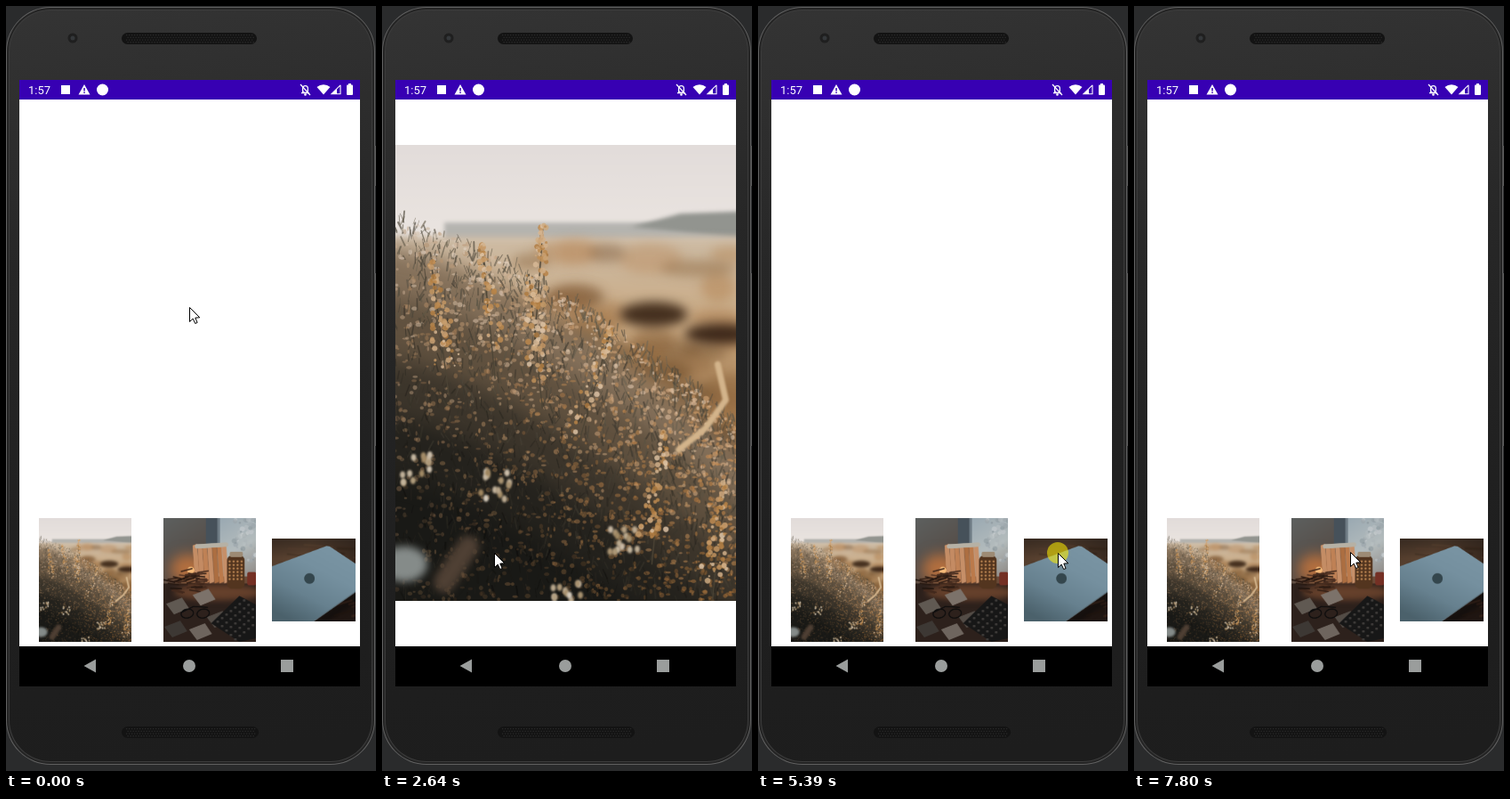
Animation of 416x859 px, one loop 8 s. Source, as an HTML page with a canvas:

```html
<!DOCTYPE html>
<html lang="en">
<head>
<meta charset="utf-8">
<title>Photo transition</title>
<style>
html, body { margin: 0; width: 100%; height: 100%; overflow: hidden; background: #2a2b2c; }
canvas { display: block; }
</style>
</head>
<body>
<canvas id="stage" width="416" height="859"></canvas>
<script>
const g = document.getElementById('stage').getContext('2d');
g.imageSmoothingQuality = 'high';

let seed = 7;
const rnd = () => (seed = seed * 16807 % 2147483647) / 2147483647;
const spread = r => (rnd() - .5) * 2 * r;
const clamp = v => Math.min(1, Math.max(0, v));

// ---------- drawing helpers ----------
function rect(c, color, x, y, w, h, r = 0) {
  c.fillStyle = color;
  c.beginPath();
  c.roundRect(x, y, w, h, r);
  c.fill();
}
function disc(c, color, x, y, rx, ry = rx) {
  c.fillStyle = color;
  c.beginPath();
  c.ellipse(x, y, rx, ry, 0, 0, 7);
  c.fill();
}
function trace(c, pts) {
  c.beginPath();
  for (let i = 0; i < pts.length; i += 2) c.lineTo(pts[i], pts[i + 1]);
}
function poly(c, color, pts) {
  trace(c, pts);
  c.fillStyle = color;
  c.fill();
}
function line(c, color, width, pts) {
  trace(c, pts);
  c.strokeStyle = color;
  c.lineWidth = width;
  c.stroke();
}
function soft(c, blur, draw) {
  c.filter = `blur(${blur}px)`;
  draw();
  c.filter = 'none';
}
function gradient(c, x0, y0, x1, y1, ...colors) {
  const grad = c.createLinearGradient(x0, y0, x1, y1);
  colors.forEach((col, i) => grad.addColorStop(i / (colors.length - 1), col));
  return grad;
}
function picture(w, h, scale, draw) {
  const canvas = document.createElement('canvas');
  canvas.width = w * scale;
  canvas.height = h * scale;
  const c = canvas.getContext('2d');
  c.scale(scale, scale);
  c.lineCap = c.lineJoin = 'round';
  draw(c);
  return canvas;
}

// ---------- photographs ----------
const meadow = picture(383, 511, 2, c => {
  rect(c, gradient(c, 0, 0, 0, 85, '#e2dcda', '#e9e3df'), 0, 0, 383, 110);
  soft(c, 5, () => {
    rect(c, '#b5b4b0', 55, 87, 350, 20);
    poly(c, '#92948f', [265, 92, 320, 77, 400, 74, 400, 105]);
  });
  soft(c, 8, () => rect(c, gradient(c, 0, 100, 0, 511, '#cdbca6', '#c9a982', '#9f7549', '#694a2e', '#332619'), -30, 103, 450, 450));

  // blurred field on the right
  soft(c, 12, () => {
    for (let i = 0; i < 60; i++) {
      const y = 120 + rnd() * 300, light = 62 - y / 9 + spread(14);
      disc(c, `hsl(30 40% ${light}% / .45)`, 130 + rnd() * 260, y, 18 + rnd() * 25, 8 + rnd() * 10);
    }
    disc(c, '#45301f', 290, 190, 38, 14);
    disc(c, '#3f2a1b', 365, 212, 40, 12);
  });

  // the heather rises to the left and gets darker with depth
  const top = x => 85 + 225 * (x / 383) ** 1.4;
  soft(c, 24, () => {
    [['#84705a', 30], ['#60513f', 85], ['#3c352b', 155], ['#24221d', 220], ['#191916', 290]].forEach(([color, drop]) => {
      const edge = [-60, top(0) + drop];
      for (let x = 0; x <= 440; x += 55) edge.push(x, top(x) + drop);
      poly(c, color, [...edge, 460, 600, -60, 600]);
    });
  });
  for (let i = 0; i < 4200; i++) {
    const x = rnd() * 383, y = top(x) + rnd() ** 1.2 * (511 - top(x));
    const d = clamp((y - top(x)) / 330), bloom = rnd() < .45;
    const light = bloom ? 72 - 42 * d + spread(12) : 32 - 22 * d + spread(8);
    const tone = `hsl(${bloom ? 30 : 40} ${bloom ? 28 + x / 16 : 14}% ${light}% / ${.65 - .25 * d})`;
    if (bloom) disc(c, tone, x, y, 1 + rnd() * 2.5, 1 + rnd() * 2);
    else line(c, tone, .6 + rnd() * 1.5, [x, y, x + spread(5), y - 4 - rnd() * 9]);
  }

  // single sprigs: foot, tip, and blossoms thinning out to the tip
  for (const [x, y, foot] of [[166, 90, 155], [243, 205, 200], [97, 112, 112], [150, 145, 165], [40, 130, 60], [303, 320, 288], [368, 375, 355]]) {
    line(c, '#4c4435', 1.3, [x, y, foot, y + 150]);
    for (let i = 0; i < 70; i++) {
      const k = rnd() ** 1.2;
      disc(c, `hsl(32 45% ${45 + rnd() * 32}% / .85)`, x + (foot - x) * k + spread(3 + 14 * k), y + 120 * k, 1 + rnd() * 2.5);
    }
  }
  soft(c, 2, () => {
    line(c, '#d3b48b', 7, [362, 246, 371, 286, 348, 318, 318, 342]);
    for (const [x, y] of [[22, 362], [112, 382], [255, 440], [193, 508]])
      for (let i = 0; i < 14; i++) disc(c, `hsl(36 25% ${50 + rnd() * 30}%)`, x + spread(17), y + spread(17), 3, 4);
  });
  soft(c, 9, () => {
    disc(c, '#858b89', 10, 470, 26, 20);
    line(c, '#4f4034', 24, [55, 490, 82, 450]);
  });
});

const desk = picture(105, 140, 4, c => {
  rect(c, gradient(c, 0, 0, 50, 80, '#5d605f', '#57504b', '#6b4b38'), 0, 0, 105, 140);
  soft(c, 30, () => disc(c, '#b5703f', 28, 57, 20, 16));
  rect(c, gradient(c, 64, 0, 105, 70, '#9aa9b2', '#b4bcbd', '#8b8580'), 62, 0, 43, 66);
  rect(c, '#46515a', 48, 0, 13, 32);
  rect(c, '#6e7b84', 61, 0, 3, 62);
  for (let i = 0; i < 60; i++) disc(c, `hsl(200 8% ${55 + rnd() * 28}% / .6)`, 80 + rnd() * 25, rnd() * 50, 1 + rnd() * 2);
  rect(c, '#2d211c', 0, 74, 105, 66);
  soft(c, 14, () => disc(c, '#65402b', 62, 84, 50, 9));
  disc(c, '#f5ba78', 31, 59, 4);
  for (let i = 0; i < 7; i++) {
    const x = 33 + i * 5.5;
    poly(c, `hsl(25 45% ${52 + spread(8)}%)`, [x, 31, x + 5, 29, x + 8, 72, x + 3, 74]);
  }
  line(c, '#b6b1a5', 5, [38, 32, 71, 30]);
  rect(c, '#53351f', 72, 42, 20, 38, 6);
  rect(c, '#9d8b75', 75, 38, 15, 6, 2);
  for (let i = 0; i < 24; i++) disc(c, '#b98351', 75 + i % 4 * 4.5, 49 + Math.floor(i / 4) * 4, 1.2);
  rect(c, '#743024', 95, 61, 10, 15, 2);
  for (let i = 0; i < 45; i++) {
    const x = rnd() * 40, y = 60 + rnd() * 22;
    line(c, `hsl(20 40% ${8 + rnd() * 16}%)`, 1.5, [x, y, x + 12, y + spread(4)]);
  }
  // loose prints on the table
  for (const [x, y, light] of [[46, 89, 45], [62, 114, 30], [16, 99, 35], [42, 128, 40], [14, 125, 22]])
    poly(c, `hsl(28 8% ${light}%)`, [x - 13, y - 2, x + 5, y - 9, x + 13, y + 3, x - 4, y + 10]);
  for (const x of [27, 45]) {
    c.beginPath();
    c.ellipse(x, 108, 7, 5, -.2, 0, 7);
    c.strokeStyle = '#0e0d0d';
    c.lineWidth = 1.3;
    c.stroke();
  }
  line(c, '#0e0d0d', 1.2, [20, 107, 34, 100, 50, 101]);
  poly(c, '#171717', [54, 119, 86, 88, 105, 98, 105, 136, 86, 140]);
  for (let i = 0; i < 35; i++) {
    const col = i % 7, row = Math.floor(i / 7);
    rect(c, '#3d3a38', 60 + col * 5 + row * 5, 116 - col * 4 + row * 5, 3, 2.4, .8);
  }
});

const laptop = picture(380, 251, 2, c => {
  rect(c, gradient(c, 0, 0, 330, 251, '#4f3a2b', '#5c4432', '#423024', '#211713', '#1b1310'), 0, 0, 380, 251);
  rect(c, gradient(c, 0, 0, 0, 60, 'rgb(25 22 20 / .45)', 'rgb(25 22 20 / 0)'), 0, 0, 380, 60);
  soft(c, 3, () => {
    for (let i = 0; i < 110; i++) {
      const x = rnd() * 380, y = rnd() * 250, light = 22 - y / 25 + spread(10);
      line(c, `hsl(24 32% ${light}% / .4)`, 2 + rnd() * 5, [x, y, x + 40 + rnd() * 50, y + 5 + spread(5)]);
    }
  });
  soft(c, 14, () => line(c, '#15100e', 30, [325, 128, 120, 270]));
  soft(c, 2, () => {
    for (let i = 0; i < 18; i++) {
      const x = 190 + rnd() * 170, y = 165 + rnd() * 75;
      line(c, `hsl(20 40% ${6 + rnd() * 14}% / .6)`, 3 + rnd() * 5, [x, y, x + 50, y - 14]);
    }
  });
  const lid = [-10, 88, 157, 26, 165, 23, 175, 24, 306, 111, 310, 116, 306, 123, 118, 254, -10, 260];
  c.translate(1, 3);
  poly(c, '#5b6d76', lid);
  c.translate(-1, -3);
  poly(c, gradient(c, 190, 20, 70, 255, '#7a95a4', '#75909f', '#67818f', '#4b616b'), lid);
  disc(c, '#34464d', 114, 121, 16);
});

// ---------- timing ----------
const LOOP = 8000;
const bursts = [0, 580, 1410, 2370, 3230, 3920, 4760, 5590, 6690, 7520];
const taps = [1900, 3920, 5390, 6690];
const TAP = 140, MORPH = 340;

// Time advances in steps of about 70 ms, counted from each burst of motion.
function stepped(t) {
  const start = bursts.findLast(b => b <= t);
  return start + Math.floor((t - start + 12) / 69) * 70;
}

// moves of the pointer: from, until, x, y
const moves = [
  [510, 1350, 140, 577], [1350, 1830, 126, 614], [3160, 3720, 95, 741], [4450, 4690, 122, 704],
  [4690, 5320, 337, 614], [5940, 6360, 265, 398], [7250, 7800, 243, 613]
];
function pointer(t) {
  let x = 206, y = 338;
  for (const [from, until, tx, ty] of moves) {
    const k = clamp((t - from) / (until - from));
    x += (tx - x) * k;
    y += (ty - y) * k;
  }
  return [x, y];
}

const shots = [
  { img: meadow, small: [37, 575, 141.5, 714], large: [15, 156, 398, 667.7] },
  { img: desk, small: [177, 575, 281.5, 714] },
  { img: laptop, small: [299, 598, 393, 691], large: [15, 285, 398, 541] }
];
// fade: how fast the other photos go, glow: how far the buttons light up
const morphs = [
  { at: 2309, shot: shots[0], opens: true, fade: 1.57, glow: 0 },
  { at: 4196, shot: shots[0], opens: false, fade: 1, glow: 1 },
  { at: 5649, shot: shots[2], opens: true, fade: 1.11, glow: 1 },
  { at: 6937, shot: shots[2], opens: false, fade: 1.02, glow: 1 }
];
function scene(t) {
  const m = morphs.findLast(v => v.at <= t) || morphs[0];
  const k = clamp((t - m.at) / MORPH), eased = k * k * (3 - 2 * k);
  const grow = m.opens ? eased : 1 - eased, veil = Math.min(grow, 1 - grow);
  return { shot: m.shot, grow, veil, rest: clamp(1 - m.fade * grow), glow: m.glow * clamp(14 * veil) };
}

// ---------- phone ----------
function grille(c, x, y, w) {
  rect(c, '#131313', x, y, w, 13, 6.5);
  for (let j = 0; j < 4; j++)
    for (let i = 5 + j % 2 * 1.5; i < w - 4; i += 3) rect(c, '#2a2a2a', x + i, y + 2 + j * 2.7, 1.3, 1.3);
}
const phone = picture(416, 859, 1, c => {
  rect(c, '#2a2b2c', 0, 0, 416, 859);
  rect(c, '#606060', 0, 1, 415, 851, 50);
  rect(c, '#242424', 1, 2, 413, 849, 49);
  rect(c, '#3c3c3c', 3, 4, 409, 845, 47);
  rect(c, gradient(c, 0, 0, 120, 859, '#343434', '#272727', '#202020', '#1d1d1d'), 4, 5, 407, 843, 46);
  rect(c, '#555', 414, 157, 2, 45);
  rect(c, '#555', 414, 300, 2, 194);
  disc(c, '#1f1f1f', 75, 36, 5.5);
  disc(c, '#34373a', 75, 36, 2.5);
  grille(c, 130, 30, 152);
  grille(c, 130, 809, 154);
});

const mix = (rgb, k) => `rgb(${rgb.map(v => v + (255 - v) * k).join(' ')})`;

function statusBar(veil) {
  const bar = mix([55, 0, 179], veil), white = '#fff';
  rect(g, bar, 15, 83, 383, 22);
  g.fillStyle = white;
  g.font = '13px Roboto, sans-serif';
  g.fillText('1:57', 25, 99);
  rect(g, white, 62, 89, 10, 10);
  poly(g, white, [88, 88, 94.5, 99.5, 81.5, 99.5]);
  rect(g, bar, 87.3, 92, 1.5, 3.5);
  rect(g, bar, 87.3, 96.5, 1.5, 1.5);
  disc(g, white, 108.5, 94, 6.5);
  // muted bell
  rect(g, white, 333, 89, 7, 9, [4, 4, 0, 0]);
  rect(g, bar, 334.3, 90.3, 4.4, 6.5, 2);
  rect(g, white, 332, 97, 9, 1.3);
  disc(g, white, 336.5, 99.5, 1.3);
  line(g, white, 1.2, [331, 88, 342, 100]);
  // reception and battery
  g.beginPath();
  g.moveTo(357, 99.5);
  g.arc(357, 99.5, 11.3, -Math.PI * .73, -Math.PI * .27);
  g.fill();
  line(g, white, 1.1, [376, 88.8, 376, 98.7, 366, 98.7, 376, 88.8]);
  poly(g, white, [372, 93, 372, 99, 366, 99]);
  rect(g, white, 383, 88.5, 7, 11.5, 1);
  rect(g, white, 385, 87, 3, 2);
}

function navBar(veil, glow) {
  rect(g, mix([0, 0, 0], veil), 15, 719, 383, 45);
  const color = mix([154, 157, 156], Math.max(veil, glow));
  poly(g, color, [87.5, 741, 101, 733.5, 101, 748.5]);
  disc(g, color, 206, 741, 7);
  rect(g, color, 309, 734, 14, 14);
}

// Photos fill the height of their box and are cropped on the right.
function photo(img, [x, y, r, b], alpha = 1) {
  const h = b - y, w = Math.min(r - x, h * img.width / img.height);
  g.globalAlpha = alpha;
  g.drawImage(img, 0, 0, w / h * img.height, img.height, x, y, w, h);
  g.globalAlpha = 1;
}

const arrow = [0, 0, 0, 16, 3.7, 12.6, 6.2, 18, 8.6, 17, 6.3, 11.6, 11.3, 11.3, 0, 0];

function draw(now) {
  const time = now % LOOP, t = stepped(time);
  const { shot, grow, veil, rest, glow } = scene(t);
  const [x, y] = pointer(t);

  g.drawImage(phone, 0, 0);
  rect(g, '#fff', 15, 105, 383, 614);
  statusBar(veil);
  navBar(veil, glow);
  for (const s of shots) if (s !== shot) photo(s.img, s.small, rest);
  photo(shot.img, shot.small.map((v, i) => v + (shot.large[i] - v) * grow));

  if (taps.some(tap => time >= tap && time < tap + TAP)) disc(g, 'rgb(255 240 0 / .55)', x, y, 12);
  g.save();
  g.translate(x + .5, y + .5);
  poly(g, '#fff', arrow);
  line(g, '#000', 1, arrow);
  g.restore();
}

const begin = performance.now();
function tick() {
  draw(performance.now() - begin);
  requestAnimationFrame(tick);
}
tick();
</script>
</body>
</html>
```
